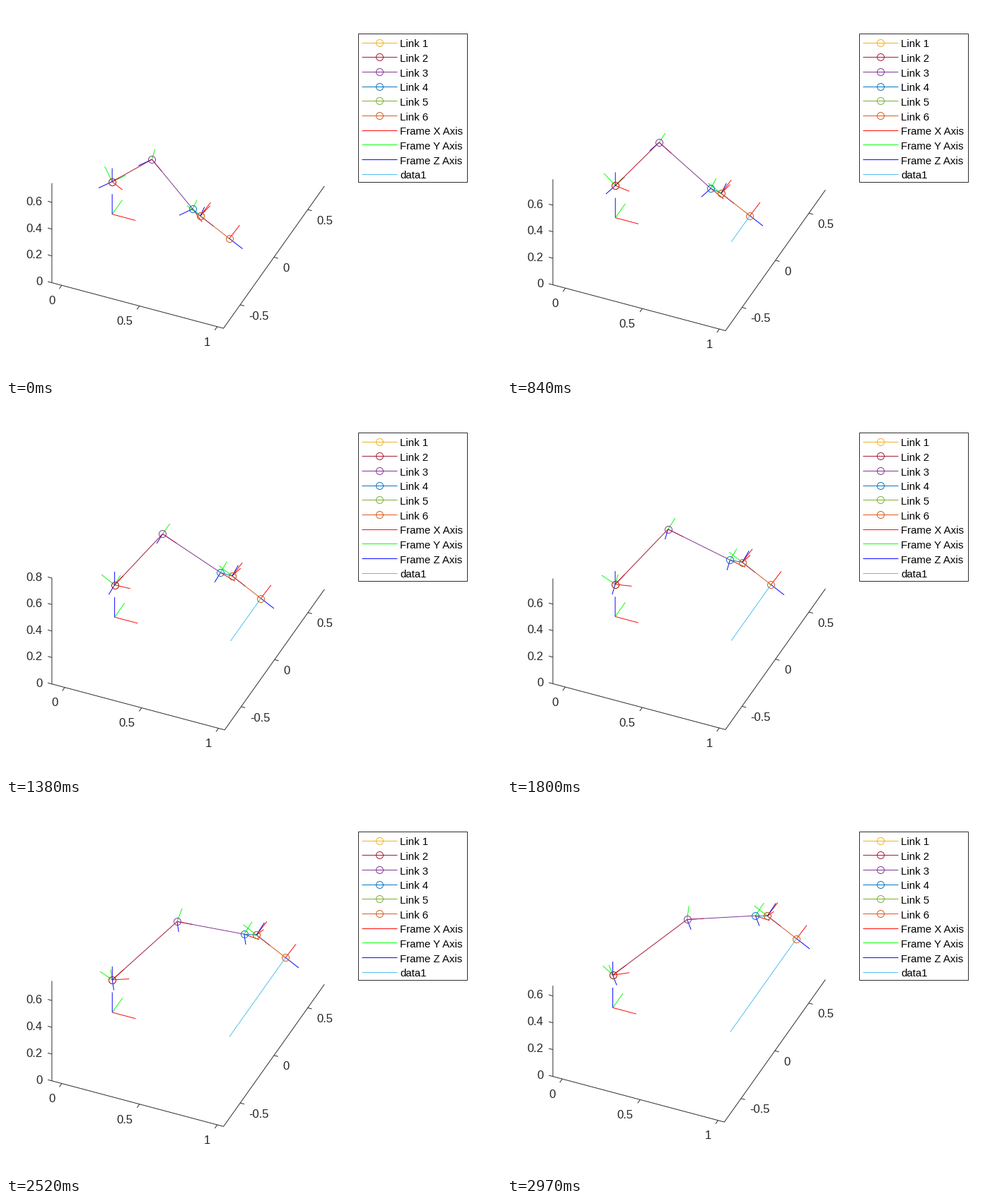
A matplotlib script that plays this animation: 700 by 525 pixels, repeating every 3000 ms.

```python
import numpy as np
import matplotlib.pyplot as plt
from matplotlib.animation import FuncAnimation
from matplotlib.patches import Rectangle

W, H, DPI = 700, 525, 100
FRAMES, INTERVAL = 100, 30
PT = 72 / DPI                       # points per pixel
LW = 0.95 * PT
INK = "#262626"

# Orthographic view and the screen box the axes are fitted into
AZ, EL = np.radians(23.48), np.radians(37.76)
LEFT, RIGHT, MID_Y = 64.9, 450.3, 252.8
YLIM = 0.747
RIGHTWARD = np.array([np.cos(AZ), np.sin(AZ), 0])
UPWARD = np.array([-np.sin(AZ) * np.sin(EL), np.cos(AZ) * np.sin(EL), np.cos(EL)])

# Robot geometry
BASE_Z, UPPER, FORE = 0.243, 0.56, 0.416
WRIST_X, WRIST_Y, TOOL = 0.07, 0.024, 0.22
AXIS = 0.1
UP = np.array([0.0, 0.0, 1.0])


def unit(v):
    v = np.asarray(v, float)
    return v / np.linalg.norm(v)


APPROACH = unit([0.9, -0.14, -0.38])
TOOL_X = np.array([0.36, 0.66, 0.66])
TOOL_X = unit(TOOL_X - TOOL_X.dot(APPROACH) * APPROACH)
TOOL_Y = np.cross(APPROACH, TOOL_X)

LINKS = ["#EDB120", "#A2142F", "#7E2F8E", "#0072BD", "#77AC30", "#D95319"]
AXIS_COLORS = ["#FF0000", "#00FF00", "#0000FF"]
TRAIL = "#4DBEEE"


def tip_at(i):
    return np.array([0.949, -0.45 + 0.98 * i / (FRAMES - 1), 0.431])


def solve(i):
    """Joint positions and (origin, x, y, z, length) frames for step i."""
    tip = tip_at(i)
    wrist = tip - TOOL * APPROACH
    out = unit([wrist[0], wrist[1], 0])
    side = np.cross(UP, out)
    base = BASE_Z * UP

    def planar(angle):
        c, s = np.cos(angle), np.sin(angle)
        return c * out + s * UP, -s * out + c * UP

    pitch = np.arctan2(APPROACH[2], APPROACH.dot(out))
    x4, y4 = planar(pitch)
    hand = wrist - WRIST_X * x4 - WRIST_Y * y4

    reach = hand - base
    dist = np.linalg.norm(reach)
    lift = np.arcsin(reach[2] / dist)
    bend = np.arccos((UPPER**2 + dist**2 - FORE**2) / (2 * UPPER * dist))
    x2, y2 = planar(lift + bend)
    elbow = base + UPPER * x2
    fore = hand - elbow
    x3, y3 = planar(np.arctan2(fore[2], fore.dot(out)))

    joints = [base, base, elbow, hand, wrist, wrist, tip]
    frames = [
        (np.zeros(3), *np.eye(3), 0.15),
        (base, out, side, UP, AXIS),
        (base, x2, y2, -side, AXIS),
        (elbow, x3, y3, -side, AXIS),
        (hand, x4, y4, -side, AXIS),
        (wrist, np.cross(y4, APPROACH), -APPROACH, y4, AXIS),
        (wrist, TOOL_X, TOOL_Y, APPROACH, AXIS),
        (tip, TOOL_X, TOOL_Y, APPROACH, AXIS),
    ]
    return joints, frames


class View:
    """Tight axis limits fitted to the fixed screen box."""

    def __init__(self, pts):
        pts = np.array(pts)
        self.x0, self.x1 = pts[:, 0].min(), pts[:, 0].max()
        self.z1 = pts[:, 2].max()
        left = np.array([self.x0, -YLIM, 0])
        right = np.array([self.x1, YLIM, 0])
        low = np.array([self.x1, -YLIM, 0])
        high = np.array([self.x0, YLIM, self.z1])
        self.scale = (RIGHT - LEFT) / (right - left).dot(RIGHTWARD)
        self.ox = LEFT - self.scale * left.dot(RIGHTWARD)
        self.oy = MID_Y + self.scale * (low + high).dot(UPWARD) / 2

    def __call__(self, p):
        p = np.asarray(p)
        return np.array([self.ox + self.scale * p.dot(RIGHTWARD),
                         self.oy - self.scale * p.dot(UPWARD)])


fig = plt.figure(figsize=(W / DPI, H / DPI), dpi=DPI, facecolor="white")
ax = fig.add_axes([0, 0, 1, 1])
ax.set_xlim(0, W)
ax.set_ylim(H, 0)
ax.axis("off")
plt.rcParams["font.family"] = "Liberation Sans"


def line(color, z, marker=None, xy=((), ()), every=None):
    return ax.plot(*xy, color=color, lw=LW, zorder=z, marker=marker,
                   markevery=every, ms=10 * PT, mfc="none", mew=LW,
                   solid_capstyle="butt")[0]


def label(x, y, s, px, ha="left", color=INK):
    return ax.text(x, y, s, fontsize=px * PT, ha=ha, va="baseline", color=color)


def draw_legend():
    ax.add_patch(Rectangle((498, 39), 154, 210, fc="white", ec=INK, lw=LW, zorder=1))
    rows = [(f"Link {k + 1}", c, "o") for k, c in enumerate(LINKS)]
    rows += [(f"Frame {n} Axis", c, None) for n, c in zip("XYZ", AXIS_COLORS)]
    rows.append(("data1", TRAIL, None))
    for k, (name, color, marker) in enumerate(rows):
        y = 51.8 + 20.65 * k
        line(color, 2, None, ((503, 553), (y, y)))
        if marker:
            line(color, 2, marker, ((528,), (y,)))
        label(557, y + 6.5, name, 15, color="black")


draw_legend()
box = line(INK, 1)
ticks = line(INK, 1)
trail = line(TRAIL, 2)
axis_lines = [line(c, 3) for c in AXIS_COLORS]
# Each joint takes the colour of the link that leaves it
link_lines = [line(c, 4, "o", every=[0]) for c in LINKS]
link_lines[-1].set_markevery(None)

XT, YT, ZT = (0, 0.5, 1), (-0.5, 0, 0.5), (0, 0.2, 0.4, 0.6, 0.8)
x_labels = [label(0, 0, f"{v:g}", 16.67, "right") for v in XT]
y_labels = [label(0, 0, f"{v:g}", 16.67) for v in YT]
z_labels = [label(0, 0, f"{v:g}", 16.67, "right") for v in ZT]

X_DIR = unit([RIGHTWARD[0], -UPWARD[0]])
Y_DIR = unit([RIGHTWARD[1], -UPWARD[1]])
GAP = np.full(2, np.nan)


def set_path(artist, pts):
    artist.set_data(*np.array(pts).T)


def draw_axes(view):
    x0, x1, z1 = view.x0, view.x1, view.z1
    set_path(box, [view(p) for p in ((x0, -YLIM, z1), (x0, -YLIM, 0),
                                     (x1, -YLIM, 0), (x1, YLIM, 0))])
    marks = []

    def tick(point, step, text, shift):
        p = view(point)
        marks.extend([p, p + 6 * step, GAP])
        text.set_position(p + shift)

    for v, t in zip(XT, x_labels):
        tick((v, -YLIM, 0), -Y_DIR, t, (-9.6, 26.8))
    for v, t in zip(YT, y_labels):
        tick((x1, v, 0), X_DIR, t, (12.3, 20.7))
    for v, t in zip(ZT, z_labels):
        t.set_visible(v <= z1)
        if v <= z1:
            tick((x0, -YLIM, v), -X_DIR, t, (-13.5, 3.8))
    set_path(ticks, marks)


def update(i):
    joints, frames = solve(i)
    ends = [o + n * a for o, *axes, n in frames for a in axes]
    view = View(ends + joints)
    draw_axes(view)
    for k, artist in enumerate(axis_lines):
        pts = []
        for o, *axes, n in frames:
            pts += [view(o), view(o + n * axes[k]), GAP]
        set_path(artist, pts)
    for artist, a, b in zip(link_lines, joints, joints[1:]):
        set_path(artist, [view(a), view(b)])
    set_path(trail, [view(tip_at(0)), view(tip_at(i))])
    return []


anim = FuncAnimation(fig, update, frames=FRAMES, interval=INTERVAL,
                     init_func=lambda: update(0), repeat=True, repeat_delay=0)
plt.show()
```
